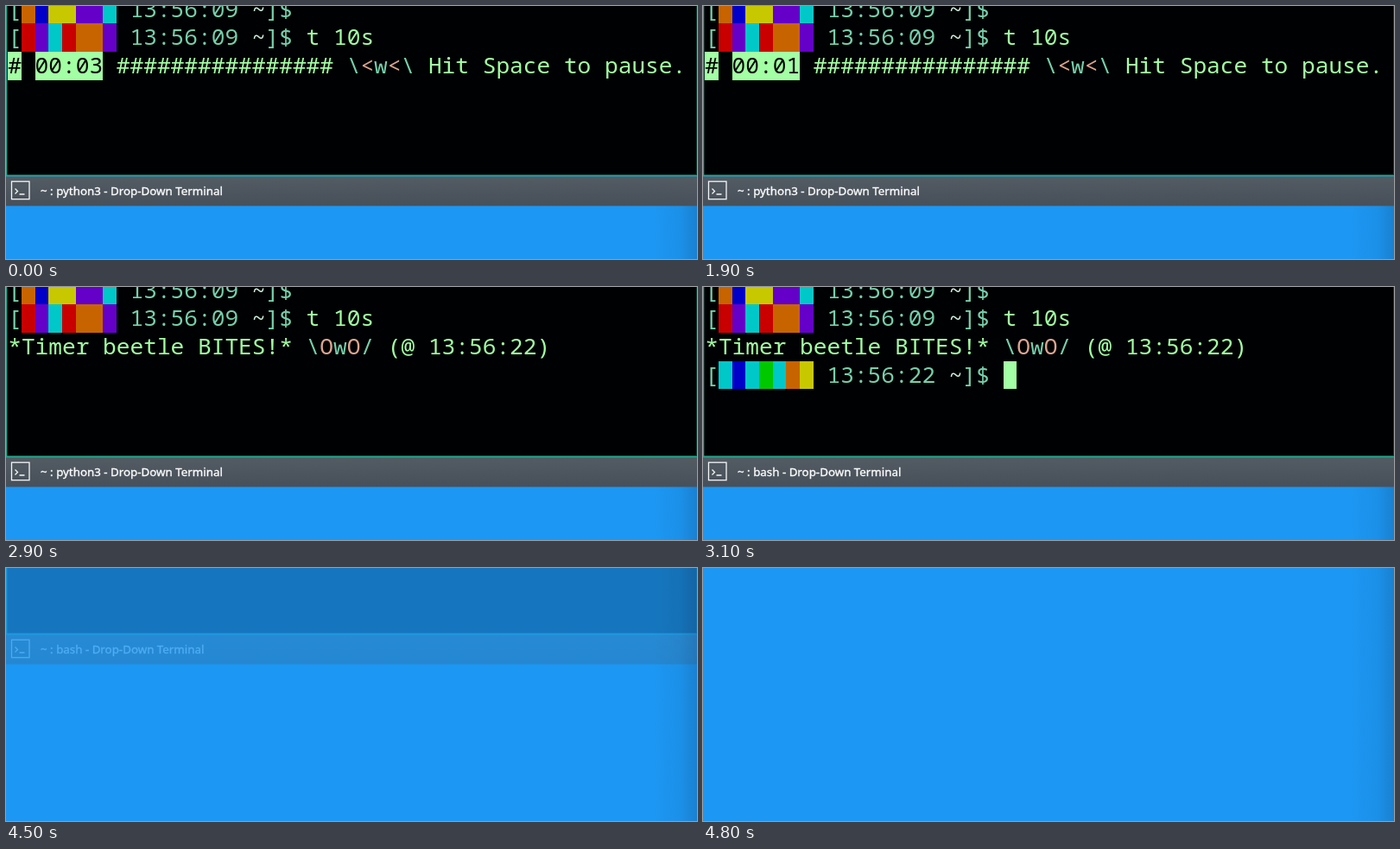
Write an HTML page with a canvas that moves like this. It is 800 by 293 pixels and loops after 4900 ms.

```html
<!DOCTYPE html>
<html lang="en">
<head>
<meta charset="utf-8">
<title>Terminal timer</title>
<style>
html, body { margin: 0; width: 100%; height: 100%; overflow: hidden; background: #1c97f3; }
canvas { display: block; width: 100%; height: 100%; }
</style>
</head>
<body>
<canvas id="stage" width="800" height="293"></canvas>
<script>
const W = 800, H = 293, LOOP = 4900, STEP = 100;
const CELL_W = 15.7, CELL_H = 32.6, LEFT = 2.2, TOP = -12.2;
const WINDOW_H = 231.5, BAR_Y = 197.5;
const GREEN = '#a3ffa3', TEAL = '#76cfab', PINK = '#dca58f', PALE = '#cdeedd';
const SWATCH = {
  r: '#c80000', o: '#c86400', y: '#c8c800', g: '#00c800',
  c: '#00c8c8', b: '#0000c8', p: '#6400c8'
};

const stage = document.getElementById('stage').getContext('2d');
const layer = document.createElement('canvas');
layer.width = W;
layer.height = Math.ceil(WINDOW_H);
const term = layer.getContext('2d');

const cellX = col => LEFT + col * CELL_W;
const rowY = row => TOP + row * CELL_H;

function fillCells(col, row, count, color) {
  const x = Math.round(cellX(col)), y = Math.round(rowY(row));
  term.fillStyle = color;
  term.fillRect(x, y, Math.round(cellX(col + count)) - x, Math.round(rowY(row + 1)) - y);
}

function write(col, row, text, color) {
  term.font = '26.2px "Noto Sans Mono", "DejaVu Sans Mono", monospace';
  term.fillStyle = color;
  [...text].forEach((ch, i) => term.fillText(ch, cellX(col + i), rowY(row) + 25));
}

function prompt(row, swatches, clock) {
  write(0, row, '[', TEAL);
  [...swatches].forEach((key, i) => fillCells(1 + i, row, 1, SWATCH[key]));
  write(9, row, clock, TEAL);
  write(18, row, '~', PALE);
  write(19, row, ']$', TEAL);
}

function face(col, row, text) {
  [...text].forEach((ch, i) => write(col + i, row, ch, i % 2 ? PINK : TEAL));
}

function countdown(left) {
  fillCells(0, 2, 1, GREEN);
  fillCells(2, 2, 5, GREEN);
  write(0, 2, '#', '#000');
  write(2, 2, '00:0' + left, '#000');
  write(8, 2, '#'.repeat(16), GREEN);
  face(25, 2, left % 2 ? '\\<w<\\' : '/>w>/');
  write(31, 2, 'Hit Space to pause.', GREEN);
}

function titleBar(program) {
  const shade = term.createLinearGradient(0, BAR_Y, 0, WINDOW_H);
  shade.addColorStop(0, '#535b63');
  shade.addColorStop(1, '#475059');
  term.fillStyle = shade;
  term.fillRect(0, BAR_Y, W, WINDOW_H - BAR_Y);

  term.strokeStyle = '#f4f6f7';
  term.lineWidth = 1.3;
  term.strokeRect(6.5, 203.2, 20.5, 20.5);
  term.beginPath();
  term.moveTo(10.5, 211.5);
  term.lineTo(13.5, 214.5);
  term.lineTo(10.5, 217.5);
  term.moveTo(15.5, 218);
  term.lineTo(21.5, 218);
  term.stroke();

  const title = `~ : ${program} - Drop-Down Terminal`;
  term.font = '13.33px "Noto Sans", "Open Sans", sans-serif';
  term.fillStyle = term.strokeStyle = '#fcfcfc';
  term.lineWidth = 0.35;
  term.fillText(title, 40, 219);
  term.strokeText(title, 40, 219);
}

function drawTerminal(t) {
  const done = t >= 2900, idle = t >= 3000;
  term.clearRect(0, 0, W, layer.height);
  term.fillStyle = '#000103';
  term.fillRect(0, 0, W, 196);

  prompt(0, 'obyyppc', '13:56:09');
  prompt(1, 'rpcroop', '13:56:09');
  write(22, 1, 't 10s', GREEN);

  if (done) {
    write(0, 2, '*Timer beetle BITES!*', GREEN);
    face(22, 2, '\\OwO/');
    write(28, 2, '(@ 13:56:22)', GREEN);
  } else {
    countdown(t < 1000 ? 3 : t < 1900 ? 2 : 1);
  }
  if (idle) {
    prompt(3, 'cbcgcoy', '13:56:22');
    fillCells(22, 3, 1, GREEN);
  }

  term.fillStyle = '#22a68c';
  term.fillRect(0, 0, 1.3, BAR_Y);
  term.fillRect(0, BAR_Y - 2, W, 2);
  term.fillStyle = '#0a3c30';
  term.fillRect(W - 1, 0, 1, BAR_Y - 2);
  titleBar(idle ? 'bash' : 'python3');
}

function drawDesktop() {
  stage.fillStyle = '#1c97f3';
  stage.fillRect(0, 0, W, H);
  const edge = stage.createLinearGradient(750, 0, W, 0);
  edge.addColorStop(0, 'rgba(24,110,180,0)');
  edge.addColorStop(0.6, 'rgba(24,110,180,0.16)');
  edge.addColorStop(1, 'rgba(24,110,180,0.55)');
  stage.fillStyle = edge;
  stage.fillRect(750, 0, 50, H);
}

// The window slides up and fades out in two steps.
function windowPose(t) {
  if (t < 4400) return { lift: 0, alpha: 1 };
  if (t < 4500) return { lift: 14, alpha: 0.92 };
  if (t < 4600) return { lift: 120, alpha: 0.21 };
  return { lift: WINDOW_H, alpha: 0 };
}

function draw(now) {
  const t = Math.floor((now % LOOP) / STEP) * STEP;
  const { lift, alpha } = windowPose(t);
  drawDesktop();
  if (alpha > 0) {
    drawTerminal(t);
    stage.globalAlpha = alpha;
    stage.drawImage(layer, 0, -lift);
    stage.globalAlpha = 1;
  }
}

const start = performance.now();
function tick() {
  draw(performance.now() - start);
  requestAnimationFrame(tick);
}
tick();
</script>
</body>
</html>
```
